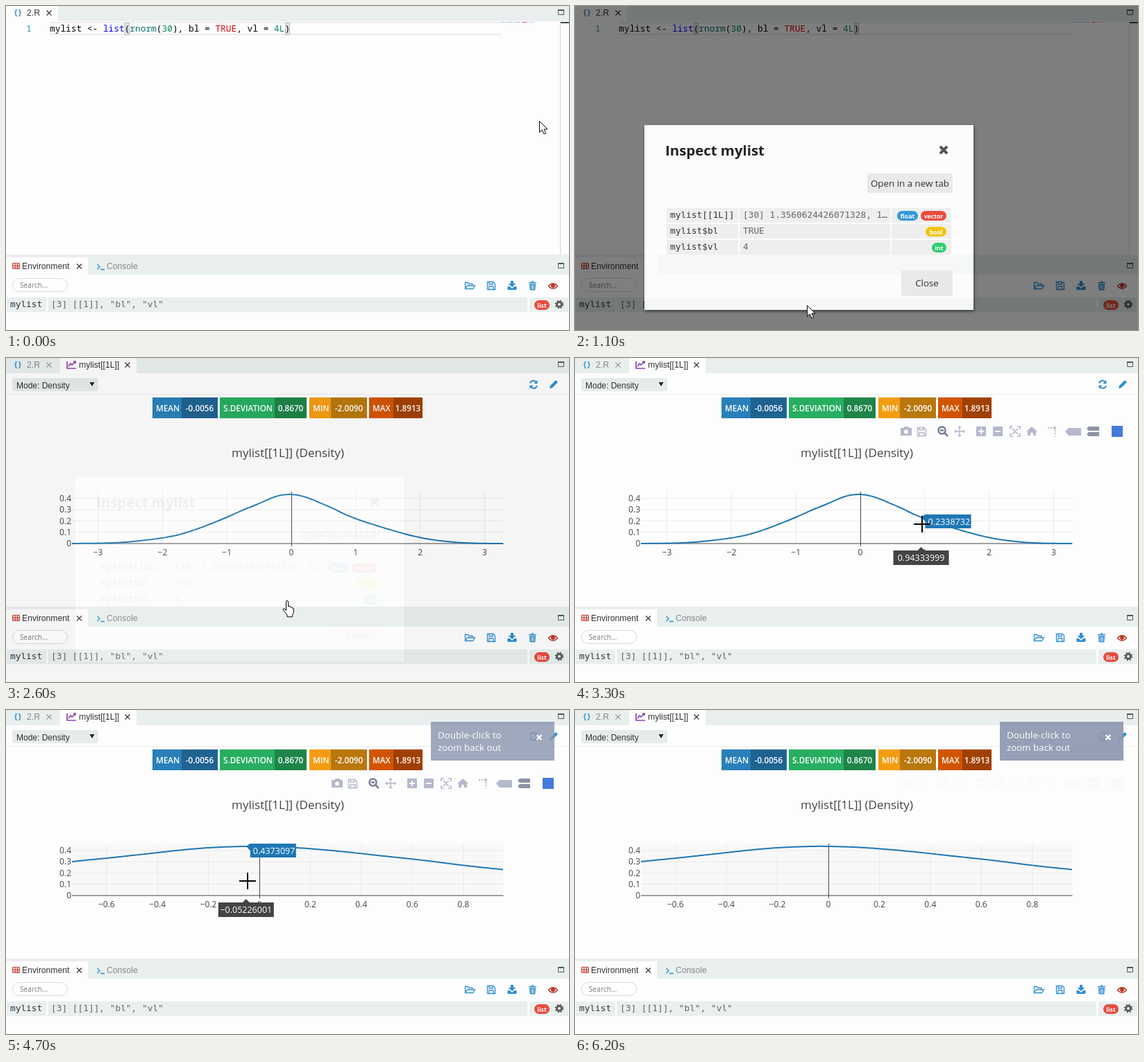
An HTML page that plays this animation: 811x468 px, repeating every 6300 ms.

```html
<!DOCTYPE html>
<html lang="en">
<head>
<meta charset="utf-8">
<title>List inspector</title>
<style>
html, body { margin: 0; width: 100%; height: 100%; overflow: hidden; background: #fdfdfd; }
svg { display: block; }
text { white-space: pre; font-family: "Open Sans", "Noto Sans", sans-serif; }
.code { font: 12.82px "Noto Sans Mono", monospace; }
.mono text { font: 12.8px "DejaVu Sans Mono", monospace; fill: #666; }
.mono .key { fill: #333; }
.tab { font: 12.2px "Liberation Sans", sans-serif; fill: #333; }
.off { fill: #888; }
.icon { font: bold 11px "Liberation Sans", sans-serif; fill: #2f8fd0; }
.pill { font-size: 8.7px; font-weight: 700; fill: #fff; text-anchor: middle; }
.stat { font-size: 11.7px; font-weight: 600; fill: #fff; }
.axis text { font-size: 12px; fill: #444; }
.hover text { font-size: 12.5px; fill: #fff; }
.btn { font-size: 13.33px; fill: #333; text-anchor: middle; }
.menu text { font-size: 11.5px; fill: #444; }
.line { fill: none; stroke: currentColor; }
</style>
</head>
<body>
<svg width="811" height="468" viewBox="0 0 811 468">
  <defs>
    <clipPath id="area"><rect x="95" y="190" width="621.5" height="82"/></clipPath>
    <filter id="soft" x="-10%" y="-10%" width="125%" height="125%">
      <feDropShadow dx="1" dy="2" stdDeviation="2" flood-opacity=".5"/>
    </filter>
    <path id="x" d="M-3.5-3.5 3.5 3.5M3.5-3.5-3.5 3.5" class="line"/>
    <g id="max"><path d="M795.5 5.5h8v7h-8z" fill="none" stroke="#555"/><path d="M795 5h9v2h-9z" fill="#555"/></g>
    <path id="pencil" d="M-6 6-5 2 3-6 6-3-2 5z"/>
    <path id="trend" d="M-6-5V5H7M-4 2-1-2 1 0 6-5M3-5H6V-2" class="line" stroke-width="1.7"/>
  </defs>

  <rect width="811" height="468" fill="#fdfdfd"/>
  <rect width="811" height="22" fill="#e9efef"/>
  <use href="#max"/>
  <rect id="tabA" width="75" height="22" fill="#fdfdfd"/>
  <text class="icon" x="12" y="13" letter-spacing="1.5">{}</text>
  <text id="nameA" class="tab" x="30" y="14">2.R</text>
  <use id="closeA" href="#x" x="62" y="10" color="#333" stroke-width="1.2"/>

  <g id="editor">
    <path d="M63 24H714M63 41H714" stroke="#ececec" stroke-width="2"/>
    <path d="M798.5 22V359" stroke="#d5d5d5"/>
    <path d="M799 24H811" stroke="#444" stroke-width="2"/>
    <path d="M714 23.5H760" stroke="#8a9ad0" stroke-dasharray="5 2 3 1" opacity=".7"/>
    <path d="M744 23.5h5" stroke="#e05050"/>
    <path d="M171.5 24.5h6v17h-6zM402.5 24.5h6v17h-6z" fill="#e3ebe3" stroke="#b9b9b9"/>
    <text class="code" x="29" y="37" fill="#2b91af">1</text>
    <text class="code" x="63" y="37">mylist &lt;- <tspan fill="#00f">list</tspan>(<tspan fill="#087070">rnorm</tspan>(<tspan fill="#09885a">30</tspan>), bl = <tspan fill="#d00">TRUE</tspan>, vl = <tspan fill="#09885a">4L</tspan>)</text>
  </g>

  <g id="chart">
    <rect x="78" width="110" height="22" fill="#fdfdfd"/>
    <use href="#trend" x="94" y="10" color="#8e44ad"/>
    <text class="tab" x="105" y="14">mylist[[1L]]</text>
    <use href="#x" x="175" y="10" color="#333" stroke-width="1.2"/>
    <rect x="9" y="29" width="124" height="19" rx="3" fill="#e6ebeb"/>
    <text class="tab" x="15" y="44" style="font-size:12px">Mode: Density</text>
    <path d="M120.500 35h7l-3.500 6z" fill="#222"/>
    <path d="M0 52.500H811" stroke="#eee"/>
    <g color="#2f8fd0" stroke-width="2">
      <path class="line" d="M755 36.500a5 5 0 0 1 9-1.500M765 40a5 5 0 0 1-9 1.500"/>
      <path d="M765.500 32v5h-5zM754.500 44.500v-5h5z" fill="currentColor"/>
    </g>
    <use href="#pencil" x="789" y="38" fill="#2f8fd0"/>
    <g id="stats"></g>
    <text x="406" y="143" text-anchor="middle" font-size="17" fill="#444">mylist[[1L]] (Density)</text>
    <rect id="plotBg" x="95" y="193" width="621.500" height="75" fill="#f8f8f8"/>
    <g id="axes" class="axis"></g>
    <path id="curve" clip-path="url(#area)" fill="none" stroke="#1f77b4" stroke-width="2"/>
    <g id="brush">
      <path id="dim" fill-opacity=".4" fill-rule="evenodd"/>
      <rect id="grip" y="216.500" width="3" height="41" fill="#fff" stroke="#444"/>
      <rect x="500.500" y="216.500" width="3" height="41" fill="#fff" stroke="#444"/>
    </g>
    <g id="hover" class="hover">
      <g id="tipY"><path d="M0 0 6-4H72V16H6V6z" fill="#1f77b4"/><text x="10" y="11"></text></g>
      <g id="tipX"><path d="M0 273l5 5H40V299H-40V278H-5z" fill="#444"/><text y="293" text-anchor="middle"></text></g>
    </g>
    <g id="modebar" fill="#b4b9cb" color="#b4b9cb" stroke-width="2">
      <path d="M469 101h4l2-2h5l2 2h3v11h-16z"/><circle cx="477" cy="106.500" r="3" fill="#fdfdfd"/>
      <path d="M493.500 100.500h9l3 3v9h-12zM496 100v4h6v-4M496 112v-4h7v4" class="line" stroke-width="1.500"/>
      <g color="#747c96"><circle cx="528.500" cy="104.500" r="5" class="line" stroke-width="2.500"/><path d="M532 108l5 5M526 104.500h5" class="line" stroke-width="2.500"/></g>
      <path d="M547 106h14M554 99v14" class="line" stroke-width="1.500"/>
      <path d="M546 106l3-3v6zM562 106l-3-3v6zM554 98l-3 3h6zM554 114l-3-3h6z"/>
      <path d="M578 99h14v14h-14zM602 99h14v14h-14z"/>
      <path d="M581 106h8M585 102v8M605 106h8" stroke="#fdfdfd"/>
      <path d="M627 103v-4h4M637 99h4v4M641 109v4h-4M631 113h-4v-4M630 102l8 8M638 102l-8 8" class="line" stroke-width="1.700"/>
      <path d="M650 106l8-7 8 7h-2v6h-4v-4h-4v4h-4v-6z"/>
      <path d="M681 101h9M691.500 104v9" class="line" stroke-dasharray="2 2"/><circle cx="691" cy="101" r="2"/>
      <path d="M706 106l5-5h18v11h-18z"/>
      <path d="M737 102l3-3h15v6h-15zM737 110l3-3h15v6h-15z" fill="#8d93a6"/>
      <rect x="773" y="98" width="16" height="16" fill="#447adb"/>
    </g>
    <g id="note">
      <rect x="612" y="17" width="178" height="56" fill="#8c97af" opacity=".92"/>
      <g fill="#fff" font-size="13.300"><text x="622" y="41">Double-click to</text><text x="622" y="59">zoom back out</text></g>
      <use href="#x" x="768" y="39.500" color="#fff" stroke-width="2.200"/>
    </g>
  </g>

  <rect y="359" width="811" height="29" fill="#e9efef"/>
  <rect y="363" width="118" height="25" fill="#fdfdfd"/>
  <use href="#max" y="366"/>
  <path d="M9.500 371.500h10v8h-10zM9 374.500h11M9 377h11M13 371v9M16.500 371v9" fill="none" stroke="#c0392b"/>
  <text class="tab" x="23" y="380">Environment</text>
  <use href="#x" x="105.500" y="376" color="#333" stroke-width="1.200"/>
  <path d="M131.500 373l3.500 3.500-3.500 3.500M136 380.500h6" fill="none" stroke="#2f8fd0" stroke-width="1.400"/>
  <text class="tab off" x="145" y="380">Console</text>
  <rect x="9.500" y="393.500" width="79" height="19" rx="9.500" fill="#fff" stroke="#d8d8d8"/>
  <text x="20" y="407" font-size="10.200" fill="#777">Search...</text>
  <g color="#2f8fd0" fill="#2f8fd0" stroke-width="1.300">
    <path class="line" d="M661.500 408.500v-9h4l1.500 2h5v2.500M661.500 408.500l3-4.500h11l-3 4.500z"/>
    <path class="line" d="M693.500 398.500h8.500l2.500 2.500v8.500h-11zM696 398.500v3.500h5v-3.500M696 409v-4h6v4"/>
    <path d="M727 397h4v4h3.500l-5.500 5-5.500-5h3.500zM722.500 405h3l3.500 3 3.500-3h3v5h-13z"/>
    <path d="M753 399h3.500l1-1.500h2l1 1.500h3.500v1.500h-11zM754 401.500h9l-.7 9h-7.600z"/>
    <path d="M756.700 403v6M758.500 403v6M760.300 403v6" stroke="#fdfdfd" stroke-width=".8"/>
  </g>
  <path d="M781.500 404.500q6.500-7.500 13 0-6.500 7.500-13 0z" fill="none" stroke="#c0392b" stroke-width="1.400"/>
  <circle cx="788" cy="404" r="3" fill="#c0392b"/>
  <path d="M1 421h57v21H1zM60 421h691v21H60zM754 421h56v21h-56z" fill="#e9efef"/>
  <g class="mono"><text class="key" x="6" y="435">mylist</text><text x="65" y="435">[3] [[1]], "bl", "vl"</text></g>
  <g id="rowPill"></g>
  <circle cx="797" cy="431" r="3.400" fill="none" stroke="#555" stroke-width="2.600"/>
  <circle cx="797" cy="431" r="5.300" fill="none" stroke="#555" stroke-width="2" stroke-dasharray="2.080"/>

  <g id="dialog">
    <rect width="811" height="468" opacity=".5"/>
    <g filter="url(#soft)"><rect x="100" y="172" width="474" height="267" fill="#fcfcfc"/></g>
    <path d="M118 359h456v29H118zM100 421h474v18H100z" fill="#f6f7f7"/>
    <text x="130" y="216" font-size="20.400" font-weight="700" fill="#222">Inspect mylist</text>
    <g transform="translate(531 208) scale(1.450)"><use href="#x" color="#555" stroke-width="2.800"/></g>
    <path d="M424 242h117a3 3 0 0 1 3 3v22a3 3 0 0 1-3 3h-117a3 3 0 0 1-3-3v-22a3 3 0 0 1 3-3zM473 382h68a3 3 0 0 1 3 3v31a3 3 0 0 1-3 3h-68a3 3 0 0 1-3-3v-31a3 3 0 0 1 3-3z" fill="#e9e9e9"/>
    <text class="btn" x="482.500" y="261">Open in a new tab</text>
    <text class="btn" x="507" y="405">Close</text>
    <g id="table" class="mono"></g>
    <g id="menu" class="menu">
      <rect x="340" y="300" width="149" height="60" fill="#fafafa" filter="url(#soft)"/>
      <rect id="pick" x="340" width="149" height="28" fill="#ededed"/>
      <use href="#pencil" x="354" y="317" fill="#555"/><text x="371" y="322">View and Edit</text>
      <use href="#trend" x="353" y="344" color="#555"/><text x="371" y="349">Fast graph</text>
    </g>
  </g>

  <g id="cursor">
    <path id="arrow" d="M.5.500V16.500L4.300 13 7 19l2.700-1.200L7 12H12z" fill="#fff" stroke="#000"/>
    <path id="hand" d="M5.500 14V2q0-1.500 1.500-1.500T8.500 2V9q1-1.200 2.500 0v1q1.500-1.200 3 .3v1q2-1 2.500 1v4q0 3-2 5v2.500H7V21L1.500 14q-1-2.500 1-2 1.500.700 3 2.500z" fill="#fff" stroke="#000"/>
    <path id="cross" d="M-12 0H12M0-12V12" stroke="#000" stroke-width="2"/>
  </g>
</svg>
<script>
const LOOP = 6300, STEP = 100, BASE = 268, UNIT = 162.5;
const $ = id => document.getElementById(id);
const show = (id, on) => { $(id).style.display = on ? '' : 'none'; };
const fade = (id, o) => { $(id).style.opacity = o; };
const move = (id, x, y) => $(id).setAttribute('transform', `translate(${x} ${y})`);

// Density samples: value, height
const density = [
  [-3.405, 0], [-2.9, .004], [-2.554, .0135], [-2.123, .04], [-1.843, .066], [-1.627, .098],
  [-1.412, .14], [-1.196, .188], [-.991, .236], [-.735, .3015], [-.586, .3354], [-.436, .3723],
  [-.3, .406], [-.177, .4277], [-.05226001, .4373097], [0, .437], [.096, .4308], [.205, .4154],
  [.34, .3877], [.477, .3538], [.64, .314], [.804, .2677], [.957, .2308], [1.12, .197],
  [1.498, .129], [1.843, .074], [2.123, .04], [2.414, .0185], [2.683, .006], [3.006, .001], [3.3, 0]
];
const views = {
  full: { zero: 411, scale: 92.8, ticks: [-3, -2, -1, 0, 1, 2, 3] },
  zoom: { zero: 365, scale: 367, ticks: [-.6, -.4, -.2, 0, .2, .4, .6, .8] }
};

function slope(i) {
  const a = density[Math.max(0, i - 1)], b = density[Math.min(density.length - 1, i + 1)];
  return (b[1] - a[1]) / (b[0] - a[0]);
}

// Cubic Hermite through the samples
function height(v) {
  let i = density.findIndex(p => p[0] > v) - 1;
  if (i < 0) return 0;
  const [a, ya] = density[i], [b, yb] = density[i + 1], w = b - a, u = (v - a) / w;
  return ya * (1 + 2 * u) * (1 - u) ** 2 + slope(i) * w * u * (1 - u) ** 2
    + yb * u * u * (3 - 2 * u) + slope(i + 1) * w * u * u * (u - 1);
}

const num = (v, digits) => (digits === undefined ? String(v) : v.toFixed(digits)).replace('-', '−');

function buildView(view) {
  let lines = '', labels = '', path = '';
  for (const v of view.ticks) {
    const x = view.zero + v * view.scale;
    if (v) lines += `<path d="M${x} 193V268" stroke="#eaeaea"/>`;
    labels += `<text x="${x}" y="285" text-anchor="middle">${num(v)}</text>`;
  }
  for (const v of [0, .1, .2, .3, .4]) {
    const y = BASE - v * UNIT;
    lines += `<path d="M95 ${y}H716.5" stroke="${v ? '#eaeaea' : '#444'}"/>`;
    labels += `<text x="94" y="${y + 4}" text-anchor="end">${v}</text>`;
  }
  lines += `<path d="M${view.zero + .5} 193V272" stroke="#444"/>`;
  for (let x = 95; x <= 716; x += 3)
    path += `${path ? 'L' : 'M'}${x} ${(BASE - height((x - view.zero) / view.scale) * UNIT).toFixed(2)}`;
  view.axes = lines + labels;
  view.path = path;
}
Object.values(views).forEach(buildView);

const pill = (x, y, w, color, label) =>
  `<rect x="${x}" y="${y}" width="${w}" height="14" rx="7" fill="${color}"/>` +
  `<text class="pill" style="font:700 8.7px 'Open Sans',sans-serif;fill:#fff" x="${x + w / 2}" y="${y + 10.5}">${label}</text>`;

$('rowPill').innerHTML = pill(761, 425, 22, '#e74c3c', 'list');
$('stats').innerHTML = [
  [211, 253, 305, '#2980b9', '#1f6391', 'MEAN', '-0.0056'],
  [308, 387, 433, '#27ae60', '#1e8449', 'S.DEVIATION', '0.8670'],
  [437, 468, 520, '#f39c12', '#b9770e', 'MIN', '-2.0090'],
  [523, 558, 600, '#d35400', '#a04000', 'MAX', '1.8913']
].map(([a, b, c, light, dark, name, value]) =>
  `<path d="M${a} 57H${b}V87H${a}z" fill="${light}"/><path d="M${b} 57H${c}V87H${b}z" fill="${dark}"/>` +
  `<text class="stat" x="${a + 5}" y="77">${name}</text>` +
  `<text class="stat" x="${(b + c) / 2}" y="77" text-anchor="middle">${value}</text>`).join('');
$('table').innerHTML = [
  ['mylist[[1L]]', '[30] 1.3560624426071328, 1…'], ['mylist$bl', 'TRUE'], ['mylist$vl', '4']
].map(([key, value], i) => {
  const y = 292 + 23 * i;
  return `<path d="M132 ${y}h103v21h-103zM237 ${y}h217v21h-217zM456 ${y}h86v21h-86z" fill="#eee"/>` +
    `<text class="key" x="137" y="${y + 14}">${key}</text><text x="242" y="${y + 14}">${value}</text>`;
}).join('') + pill(464, 296, 30, '#3498db', 'float') + pill(498, 296, 37, '#e74c3c', 'vector')
  + pill(505, 319, 30, '#f1c40f', 'bool') + pill(514, 342, 21, '#2ecc71', 'int');

// Linear track through [time, ...values] keys
function track(keys, t) {
  const i = keys.findIndex(k => k[0] > t);
  if (i === 0) return keys[0].slice(1);
  if (i < 0) return keys[keys.length - 1].slice(1);
  const a = keys[i - 1], b = keys[i], u = (t - a[0]) / (b[0] - a[0]);
  return a.slice(1).map((v, j) => v + (b[j + 1] - v) * u);
}

const pointer = [
  [0, 768, 166], [100, 742, 185], [200, 640, 262], [400, 404, 402], [500, 334, 432],
  [1100, 334, 432], [1200, 336, 420], [1300, 338, 392], [1500, 338, 302], [1900, 338, 302],
  [2200, 404, 350], [2400, 404, 350], [2500, 398, 350], [2700, 398, 350], [2800, 402, 300],
  [2900, 403, 262], [3100, 491, 245], [3300, 500, 240], [3500, 462, 240], [3700, 399, 240],
  [3800, 388, 240], [4100, 343, 240], [4300, 343, 240], [4700, 348, 247], [4800, 362, 247],
  [4900, 392, 247], [5000, 440, 247], [5200, 580, 247], [5400, 673, 246], [5900, 673, 246], [6000, 792, 92]
];
const dialogFade = [[800, 0], [900, .35], [1000, .8], [1100, 1], [2400, 1], [2500, .45], [2600, .06], [2800, 0]];
const barFade = [[2800, 0], [3100, 1], [3300, 1], [3800, .1], [4100, 0], [4200, 0], [4500, 1], [5900, 1], [6200, .03]];
const noteFade = [[4200, 0], [4700, .9], [4900, 1]];

const between = (t, a, b) => t >= a && t < b;
let shown;

function drawHover(view, x) {
  const first = -.05226001, gap = .0131;
  const v = first + Math.round(((x - 2 - view.zero) / view.scale - first) / gap) * gap;
  const px = view.zero + v * view.scale, h = height(v);
  move('tipY', px, BASE - h * UNIT);
  move('tipX', px, 0);
  $('tipY').lastChild.textContent = num(h, 7);
  $('tipX').lastChild.textContent = num(v, 8);
}

function render(t) {
  const charted = t >= 2500, zoomed = t >= 4300, view = zoomed ? views.zoom : views.full;
  const [x, y] = track(pointer, t);

  show('editor', !charted);
  show('chart', charted);
  $('tabA').setAttribute('fill', charted ? '#e9efef' : '#fdfdfd');
  $('nameA').style.fill = charted ? '#888' : '#333';
  $('closeA').setAttribute('color', charted ? '#999' : '#333');

  if (shown !== view) {
    $('axes').innerHTML = view.axes;
    $('curve').setAttribute('d', view.path);
    shown = view;
  }
  show('plotBg', zoomed);

  const dragging = between(t, 3400, 4300);
  show('brush', dragging);
  if (dragging) {
    const left = track(pointer, Math.min(t, 4100) - STEP)[0];
    $('dim').setAttribute('d', `M95 193H716.5V272H95zM${left} 193H500V272H${left}z`);
    $('grip').setAttribute('x', left - 2.5);
  }

  const hovering = between(t, 2900, 3400) || between(t, 4500, 6000);
  show('hover', hovering);
  if (hovering) drawHover(view, x);

  fade('modebar', track(barFade, t)[0]);
  fade('note', track(noteFade, t)[0]);
  const veil = track(dialogFade, t)[0];
  show('dialog', veil > 0);
  fade('dialog', veil);
  show('menu', between(t, 1700, 2500));
  $('pick').setAttribute('y', t < 2100 ? 302 : 331);

  const kind = between(t, 2500, 2900) ? 'hand' : between(t, 2900, 6000) ? 'cross' : 'arrow';
  for (const k of ['arrow', 'hand', 'cross']) show(k, k === kind);
  show('cursor', t < 6100);
  move('cursor', x, y);
}

const start = performance.now();
function tick() {
  const t = (performance.now() - start) % LOOP;
  render(Math.floor(t / STEP) * STEP);
  requestAnimationFrame(tick);
}
tick();
</script>
</body>
</html>
```
